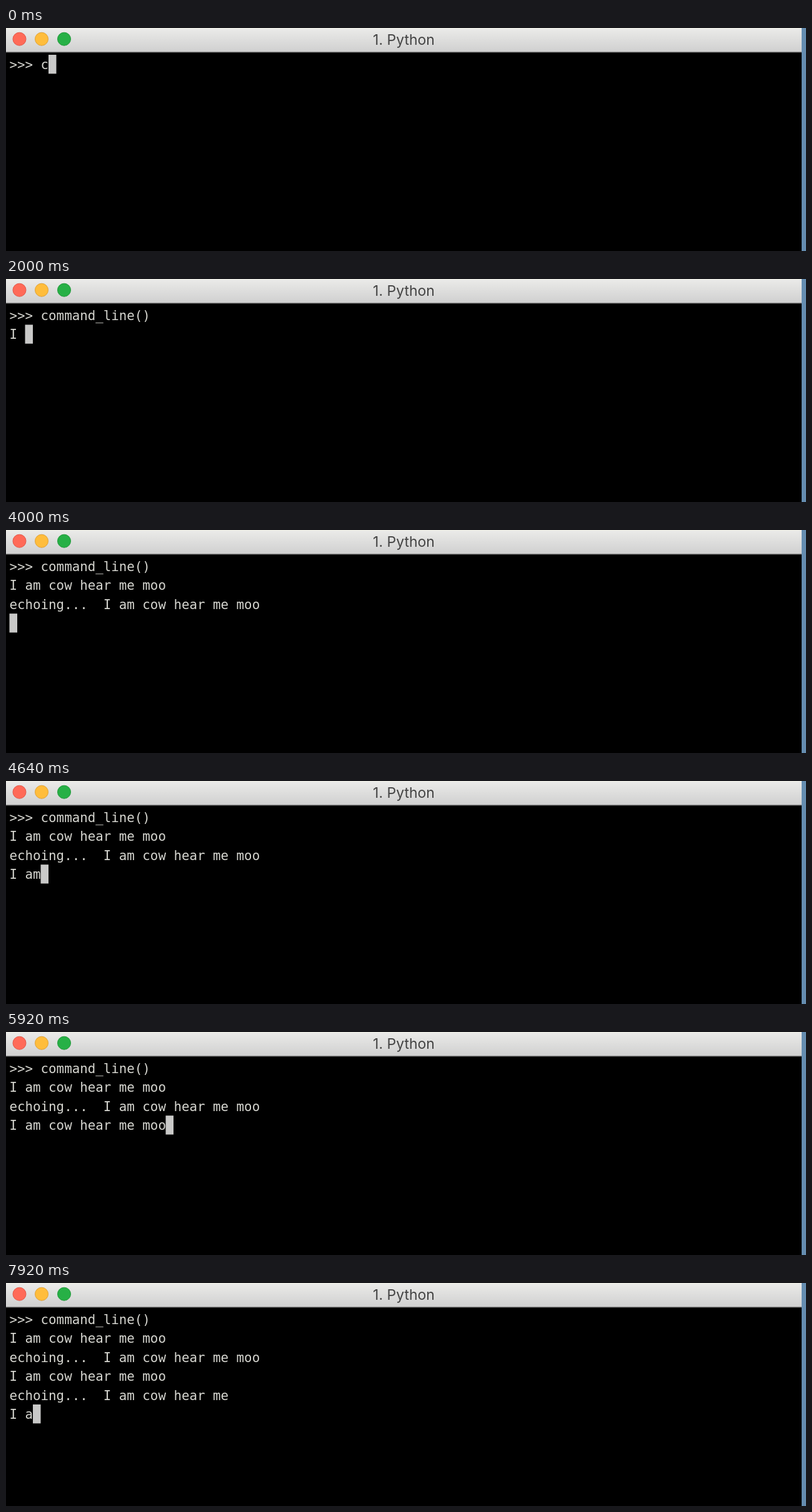
Recreate the animation shown at these times as an HTML page. Size 1280x358 px, loop 8000 ms.

```html
<!DOCTYPE html>
<html lang="en">
<head>
<meta charset="utf-8">
<title>Python terminal</title>
<style>
  html, body { margin: 0; width: 100%; height: 100%; overflow: hidden; background: #000; }
  svg { display: block; width: 100%; height: 100%; }
  .term { font: 20.8px "DejaVu Sans Mono", monospace; fill: #d6d6d0; }
  .title { font: 23px Inter, sans-serif; fill: #444; text-anchor: middle; }
</style>
</head>
<body>
<svg viewBox="0 0 1280 358" xmlns="http://www.w3.org/2000/svg">
  <defs>
    <linearGradient id="bar" x1="0" y1="0" x2="0" y2="1">
      <stop offset="0" stop-color="#ebebe9"/>
      <stop offset="1" stop-color="#d0d0d0"/>
    </linearGradient>
  </defs>
  <rect width="1280" height="358"/>
  <rect width="1273" height="38" fill="url(#bar)"/>
  <rect width="1273" height="1" fill="#f4f4ea"/>
  <rect y="38" width="1273" height="1.4" fill="#858585"/>
  <rect x="1273" width="7" height="358" fill="#658db0"/>
  <g stroke-width="1">
    <circle cx="21.5" cy="17.7" r="10.5" fill="#ff6a58" stroke="#e2574a"/>
    <circle cx="57" cy="17.7" r="10.5" fill="#ffbd3c" stroke="#e0a135"/>
    <circle cx="93" cy="17.7" r="10.5" fill="#27b046" stroke="#1f9838"/>
  </g>
  <text class="title" x="636.5" y="27">1. Python</text>
  <g id="lines" class="term"></g>
  <rect id="cursor" width="12.5" height="30.4" fill="#c9c9c8"/>
  <text id="under" class="term" style="fill:#000"></text>
</svg>
<script>
const LOOP = 8000, STEP = 80, KEY = 74;
const LEFT = 5.5, TOP = 43, CELL = 12.5, ROW = 30.4, BASE = 23;
const PROMPT = ">>> ", COMMAND = "command_line()", PHRASE = "I am cow hear me moo";
const ECHO = "echoing...\u00a0\u00a0"; // no-break spaces do not collapse

const $ = id => document.getElementById(id);
const cursor = $("cursor"), under = $("under");

function place(el, x, y) {
  el.setAttribute("x", x);
  el.setAttribute("y", y);
}

const rows = Array.from({ length: 6 }, (_, i) => {
  const el = document.createElementNS("http://www.w3.org/2000/svg", "text");
  place(el, LEFT, TOP + i * ROW + BASE);
  return $("lines").appendChild(el);
});

const typed = (text, t, start) =>
  text.slice(0, Math.max(0, Math.floor((t - start) / KEY)));

// Terminal contents and cursor cell at time t
function screen(t) {
  const lines = [PROMPT + typed(COMMAND, t, -KEY)];
  if (t >= 1280) lines.push(typed(PHRASE, t, 1852));
  if (t >= 3520) lines.push(ECHO + PHRASE, typed(PHRASE, t, 4310));
  if (t >= 6960) lines.push(ECHO + PHRASE.slice(0, 16), typed(PHRASE, t, 7690));

  const row = lines.length - 1;
  let col = lines[row].length;
  if (row === 3 && t >= 6240) col -= Math.min(4, 1 + Math.floor((t - 6240) / 160));
  return { lines, row, col };
}

function draw(t) {
  const { lines, row, col } = screen(t);
  rows.forEach((el, i) => { el.textContent = lines[i] || ""; });
  const x = LEFT + col * CELL, y = TOP + row * ROW;
  place(cursor, x, y);
  place(under, x, y + BASE);
  under.textContent = lines[row][col] || "";
}

const begin = performance.now();
function tick() {
  const t = (performance.now() - begin) % LOOP;
  draw(Math.floor(t / STEP) * STEP);
  requestAnimationFrame(tick);
}
draw(0);
requestAnimationFrame(tick);
</script>
</body>
</html>
```
